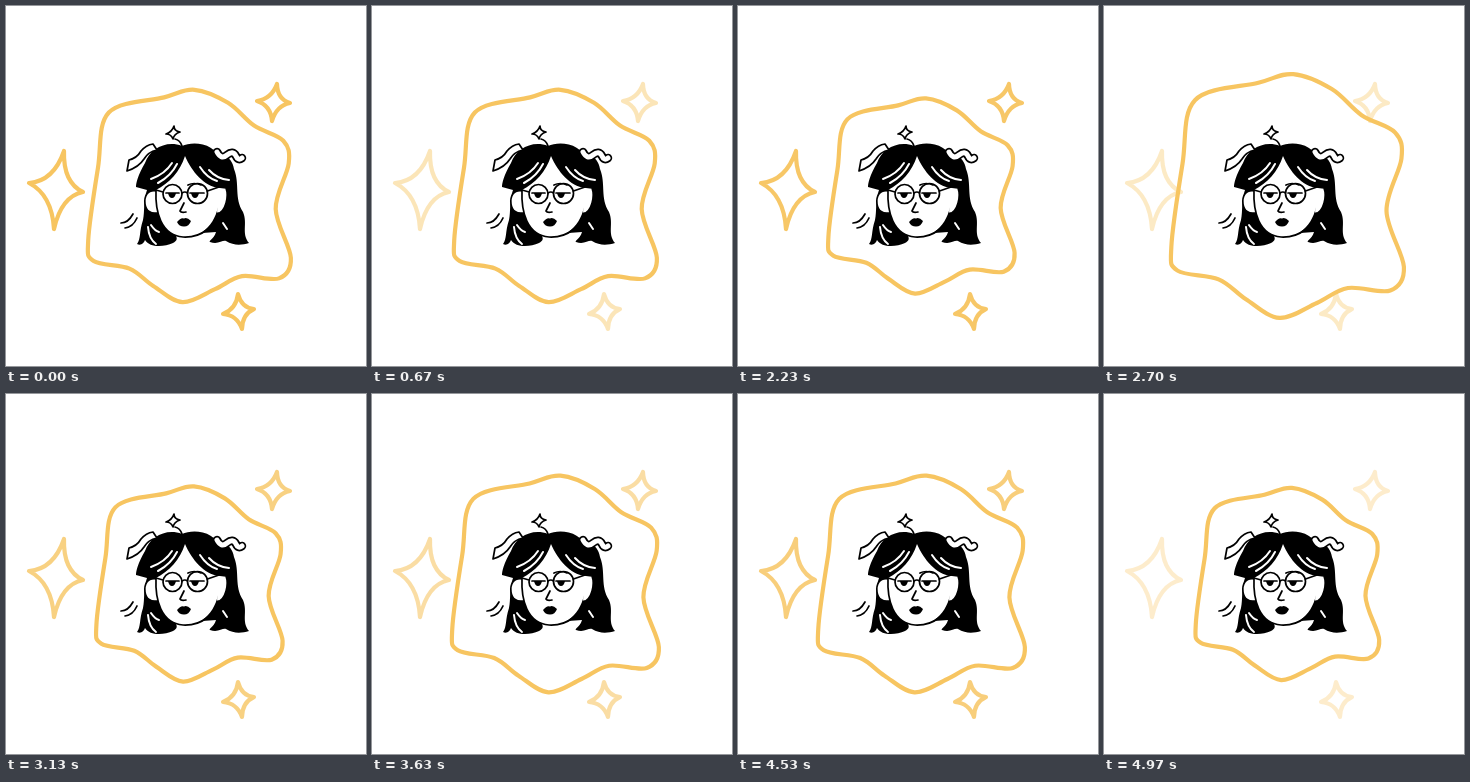
An HTML page for the animation above (5.01 s loop, 360 px wide and 360 px high).

```html
<!DOCTYPE html>
<html lang="en">
<head>
<meta charset="utf-8">
<title>Pulsing portrait</title>
<style>
html, body { margin: 0; width: 100%; height: 100%; overflow: hidden; background: #fff; }
svg { display: block; width: 100vw; height: 100vh; }
path, circle { stroke-linecap: round; stroke-linejoin: round; }
.gold { fill: none; stroke: #f7c561; stroke-width: 4.2; }
.ink { fill: none; stroke: #000; stroke-width: 1.7; }
.paper { fill: #fff; }
.shine { fill: none; stroke: #fff; stroke-width: 2; }
</style>
</head>
<body>
<svg viewBox="0 0 360 360">
  <path id="blob" class="gold" vector-effect="non-scaling-stroke"/>
  <path id="stars" class="gold"/>

  <!-- hair -->
  <path d="M176 140C160 134 144 143 139 157C132 169 130 177 130 181L141 184C137 195 139 205 137 214C133 226 135 233 131 238C135 240 138 237 139 234C144 242 158 241 167 237C171 235 172 232 169 229L210 226C208 233 202 235 204 236C212 239 216 234 220 235C228 240 236 239 243 237C235 227 242 218 237 206C228 192 234 178 228 163C226 148 211 147 205 142C195 136 183 137 176 140Z"/>
  <!-- ears and face -->
  <path class="ink paper" d="M151 185C141 183 138 191 139 198C140 205 145 208 151 207M212 181L220 182C223 190 220 206 211 208"/>
  <path class="paper" d="M150 184C149 206 155 229 177 231C200 232 213 213 214 187L213 182C198 180 186 166 179 150C174 166 163 177 150 184Z"/>
  <path class="ink" d="M150 184C149 206 155 229 177 231C198 232 209 218 212 207"/>
  <path class="shine" d="M145 173Q159 168 166 157M152 177Q165 170 171 158M194 161Q201 172 211 175M203 164Q211 173 223 174M142 221Q143 233 150 238M145 219Q149 225 153 226M217 217L221 223"/>

  <!-- glasses, eyes, nose, mouth -->
  <g class="ink">
    <circle cx="166.5" cy="188" r="9.5"/>
    <circle cx="191.5" cy="187.5" r="10"/>
    <path d="M176 187Q179 185 181.5 187M157 186L150 184M201.5 185L213 181M160 187H173M184 187H198M182 179Q188 176 195 179M178 197L174 205Q175 207 180 206"/>
  </g>
  <path d="M162 187H170Q169 192 166 192Q163 192 162 187ZM185 187H193Q192 192 189 192Q186 192 185 187Z"/>
  <path d="M171 216Q175 211 178 212.5Q181 211 185 215Q183 220.500 178 220.500Q173 220.500 171 216Z"/>

  <!-- ribbons, spark and dashes -->
  <path class="ink paper" d="M121 165L123 154Q131 152 135 145Q140 139 147 138L151 144Q142 146 138 153Q133 161 121 165Z"/>
  <path class="ink" style="stroke-width:8.5" d="M211 146Q215 154 221 149Q227 144 230 150Q232 155 236 152"/>
  <path class="shine" style="stroke-width:5" d="M211 146Q215 154 221 149Q227 144 230 150Q232 155 236 152"/>
  <path class="ink paper" d="M168 120Q168 125 174 126Q168 128 167 133Q165 128 160 128Q166 126 168 120Z"/>
  <path class="ink" d="M169 133Q174 134 176 140M115 217Q122 217 127 208M119 222Q127 221 131 212"/>
</svg>
<script>
const LOOP = 5010, FPS = 30, FRAMES = 150;
const BEAT = 9, BIG_BEAT = 2 * BEAT, FADE = 33;
const CENTER = [183, 190];

// Lobes and valleys of the outline at rest
const outline = [
  [188, 92], [219, 104], [243, 125], [270, 139], [275, 160], [263, 202],
  [277, 247], [266, 266], [232, 264], [207, 276], [177, 288], [150, 273],
  [128, 257], [95, 250], [90, 231], [99, 164], [109, 113], [160, 99]
];
// Tips of each star, clockwise from the top
const sparkles = [
  [[58, 145], [77, 186], [48, 223], [23, 177]],
  [[271, 78], [284, 97], [266, 115], [251, 95]],
  [[232, 288], [248, 303], [236, 323], [217, 308]]
];

const blob = document.getElementById('blob');
const stars = document.getElementById('stars');
const mix = (a, b, t) => a.map((v, k) => v + (b[k] - v) * t);

// Closed Catmull-Rom curve through the points
function smoothPath(points) {
  const at = i => points[(i + points.length) % points.length];
  const handle = (p, a, b) => p.map((v, k) => v + (b[k] - a[k]) / 6);
  return 'M' + points[0] + points.map((p, i) => {
    const next = at(i + 1);
    return 'C' + [handle(p, at(i - 1), next), handle(next, at(i + 2), p), next].join(' ');
  }).join('') + 'Z';
}

// Sides bend in towards the middle of the star
function starPath(tips) {
  const middle = mix(mix(tips[0], tips[2], 0.5), mix(tips[1], tips[3], 0.5), 0.5);
  return 'M' + tips[0] + tips.map((tip, i) => {
    const next = tips[(i + 1) % tips.length];
    return 'Q' + mix(mix(tip, next, 0.5), middle, 0.65) + ' ' + next;
  }).join('') + 'Z';
}

function draw(now) {
  const n = Math.min(FRAMES - 1, Math.floor((now % LOOP + 6) * FPS / 1000));
  const pulse = ((1 + Math.cos(2 * Math.PI * (n - 1) / BEAT)) / 2) ** 1.5;
  // Every second beat kicks outward for a single step
  const kick = n % BIG_BEAT === BEAT ? 0.16 : 0;
  const [x, y] = CENTER;
  blob.setAttribute('transform',
    `translate(${x} ${y}) scale(${0.98 + 0.125 * pulse + kick}) translate(${-x} ${-y})`);
  const away = Math.abs(n / FADE - Math.round(n / FADE)) * 2;
  stars.setAttribute('opacity', 1 - 0.7 * away);
}

blob.setAttribute('d', smoothPath(outline));
stars.setAttribute('d', sparkles.map(starPath).join(''));
const start = performance.now();
function tick() {
  draw(performance.now() - start);
  requestAnimationFrame(tick);
}
tick();
</script>
</body>
</html>
```
